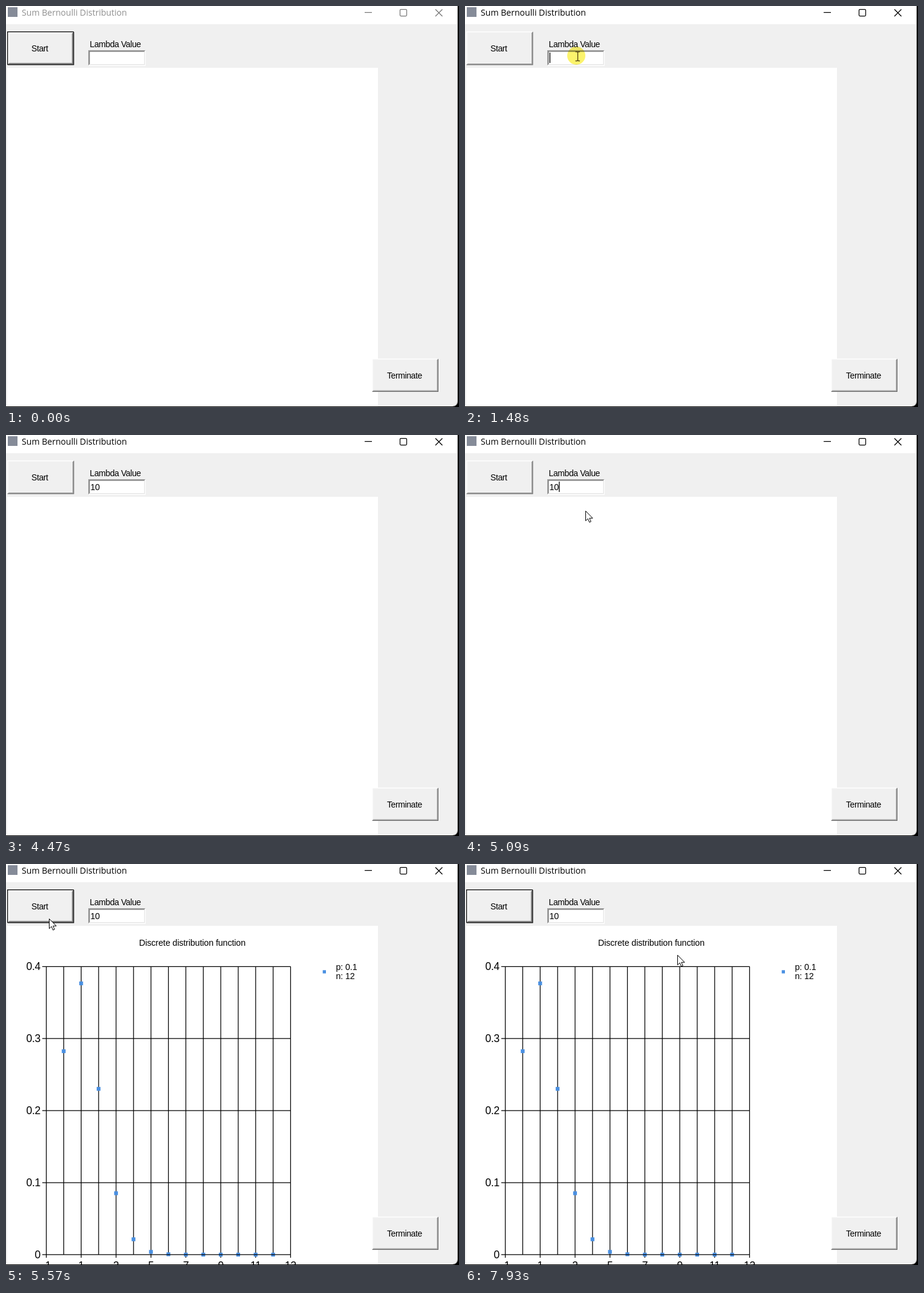
These frames come from a looping animation (749 px wide and 662 px high, 8 s). An HTML page:

```html
<!DOCTYPE html>
<html lang="en">
<head>
<meta charset="utf-8">
<title>Sum Bernoulli Distribution</title>
<style>
html, body { margin: 0; width: 100%; height: 100%; overflow: hidden; background: #f0f0f0; }
svg { display: block; font: 14px "Liberation Sans", Arial, sans-serif; letter-spacing: -.4px; }
.line { fill: none; stroke-width: 1.25; }
.caption { font: 14.1px "Open Sans", sans-serif; letter-spacing: 0; }
.axis { font-size: 17.5px; letter-spacing: -.3px; }
.chart-text { font-size: 14.3px; letter-spacing: -.12px; }
#halo { mix-blend-mode: multiply; }
</style>
</head>
<body>
<svg id="stage" width="749" height="662" viewBox="0 0 749 662"></svg>
<script>
const LOOP = 8000;

const rect = (x, y, w, h, fill) => `<rect x="${x}" y="${y}" width="${w}" height="${h}" fill="${fill}"/>`;
const line = (d, stroke) => `<path class="line" d="${d}" stroke="${stroke}"/>`;
const text = (x, y, s, cls = '', anchor = 'start') =>
  `<text x="${x}" y="${y}" class="${cls}" text-anchor="${anchor}">${s}</text>`;

// Thin frame, n line widths inside the box: top-left colour a, bottom-right colour b
function edge(x, y, w, h, n, a, b) {
  const inset = 1.25 * (n + .5), l = x + inset, t = y + inset, r = x + w - inset, d = y + h - inset;
  return line(`M${l} ${d}V${t}H${r}`, a) + line(`M${l} ${d}H${r}V${t}`, b);
}
const raised = (x, y, w, h, n = 0) =>
  edge(x, y, w, h, n + 1, '#f4f4f4', '#a0a0a0') + edge(x, y, w, h, n, '#fff', '#696969');

function chart() {
  const x0 = 66.6, dx = 28.85, y0 = 644.9, scale = 1189, right = x0 + 14 * dx;
  let grid = '', labels = '', points = '';
  for (let k = 0; k <= 14; k++) {
    const x = x0 + dx * k;
    grid += `M${x} ${y0 - .4 * scale}V${k % 2 ? y0 : 650}`;
    if (k % 2 === 0) labels += text(x, 669, k - 1, 'axis', 'middle');
  }
  for (let k = 0; k <= 4; k++) {
    const y = y0 - .1 * scale * k;
    if (k) grid += `M60 ${y}H${right}`;
    labels += text(57, y + 6, k ? '0.' + k : '0', 'axis', 'end');
  }
  // Binomial probabilities for n = 12, p = 0.1
  let p = .9 ** 12;
  for (let k = 0; k <= 12; k++) {
    points += rect(x0 + dx * (k + 1) - 3.2, y0 - p * scale - 3.2, 6.3, 6.3, '#4a90e2');
    p *= (12 - k) / (k + 1) / 9;
  }
  return line(grid, '#000') + points + line(`M60 ${y0}H${right}`, '#000')
    + labels + rect(523.7, 175.3, 5.3, 5.3, '#4a90e2')
    + text(220, 135, 'Discrete distribution function', 'chart-text')
    + text(545.5, 175, 'p: 0.1', 'chart-text') + text(545.5, 190, 'n: 12', 'chart-text');
}

stage.innerHTML = rect(0, 0, 749, 662, '#f0f0f0') + rect(0, 0, 749, 30, '#fff')
  + rect(3, 2, 16, 16, '#858b98')
  + `<g id="title">${text(26, 16, 'Sum Bernoulli Distribution', 'caption')}</g>`
  + `<g id="controls" class="line"><path d="M593 10.5H605M710 5.5L721.5 17M721.5 5.5L710 17"/>
     <rect x="651.5" y="5.5" width="11" height="11" rx="1.5"/></g>`
  + rect(2, 102, 613, 560, '#fff')
  + `<g id="plot">${chart()}</g>`
  + rect(605, 582, 110, 55, '#f0f0f0') + raised(605, 582, 110, 55) + text(630, 615, 'Terminate')
  + `<g id="normal">${raised(2, 42, 110.5, 55.5)}</g>`
  + `<g id="focused">${raised(2, 42, 110.5, 55.5, 1) + edge(2, 42, 110.5, 55.5, 0, '#000', '#000')}</g>`
  + `<g id="pressed">${edge(2, 42, 110.5, 55.5, 1, '#a0a0a0', '#a0a0a0') + edge(2, 42, 110.5, 55.5, 0, '#000', '#000')}</g>`
  + `<g id="startText">${text(42, 75, 'Start')}</g>`
  + text(138.5, 68, 'Lambda Value')
  + rect(136, 73, 95, 25.5, '#fff') + edge(136, 73, 95, 25.5, 0, '#a0a0a0', '#fff')
  + edge(136, 73, 95, 25.5, 1, '#696969', '#e3e3e3')
  + '<text id="entry" x="139.5" y="91" class="chart-text"></text>'
  + `<g id="caret">${rect(0, 77, 1.3, 17, '#000')}</g>`
  + line('M746.5 0V653a8 8 0 0 1-8 8', '#bbb')
  + '<path fill-rule="evenodd" d="M-20-20H749V662H-20ZM-30-30H747V653a8 8 0 0 1-8 8H-30Z"/>'
  + '<circle id="halo" r="15" fill="#fbf36c"/>'
  + '<path id="arrow" d="M0 0V16.2L3.7 12.7L6.2 18.6L8.8 17.5L6.3 11.8H11.6Z" fill="#fff" stroke="#000"/>'
  + `<g id="beam">${line('M-3.5-7.5H-.5L.5-6.5L1.5-7.5H4M-3.5 7.5H-.5L.5 6.5L1.5 7.5H4M.5-6.5V6.5', '#4a3a10')}</g>`;

// Pointer legs: start, step length, visible until, [step, x, y] stops
const legs = [
  [590, 68.2, 1890, [[0, 663, 164], [3, 400, 150], [6, 240, 130], [8, 185, 113], [9, 186, 92], [11, 186, 83]]],
  [4740, 69, 6630, [[0, 522, 213], [2, 430, 188], [5, 200, 126], [8, 80, 93], [9, 72, 91]]],
  [6630, 70, 7720, [[0, 84, 100], [2, 220, 200], [4, 430, 345], [6, 600, 463], [7, 630, 481],
    [8, 637, 492], [9, 644, 440], [10, 648, 389]]],
  [7720, 70, LOOP, [[0, 610, 358], [1, 500, 260], [2, 400, 185], [3, 352, 151]]]
];

function pointer(t) {
  const leg = legs.find(([from, , to]) => t >= from && t < to);
  if (!leg) return null;
  const [from, step, , stops] = leg;
  const s = Math.min(Math.floor((t - from) / step + .02), stops.at(-1)[0]);
  const i = Math.max(1, stops.findIndex(p => p[0] >= s));
  const a = stops[i - 1], b = stops[i], f = (s - a[0]) / (b[0] - a[0]);
  return [a[1] + (b[1] - a[1]) * f, a[2] + (b[2] - a[2]) * f];
}

const within = (t, ...spans) => spans.some(([a, b]) => t >= a && t < b);
const el = id => document.getElementById(id);
const show = (id, on) => el(id).setAttribute('visibility', on ? 'visible' : 'hidden');
const move = (id, x, y) => el(id).setAttribute('transform', `translate(${x} ${y})`);

function draw(t) {
  const active = t >= 1410, down = within(t, [5430, 5570]);
  el('title').setAttribute('fill', active ? '#000' : '#8f8f8f');
  el('controls').setAttribute('stroke', active ? '#000' : '#777');

  show('normal', within(t, [1410, 5430]));
  show('focused', !active || t >= 5570);
  show('pressed', down);
  move('startText', down ? 1 : 0, down ? 1 : 0);
  show('plot', t >= 5570);

  const typed = t < 3880 ? '' : t < 3940 ? '1' : '10';
  el('entry').textContent = typed;
  move('caret', 139.8 + 7.7 * typed.length, 0);
  show('caret', within(t, [1410, 2090], [2630, 3150], [3680, 4470], [5010, 5430]));

  const at = pointer(t);
  const overBox = at && at[0] > 136 && at[0] < 231 && at[1] > 73 && at[1] < 99;
  show('arrow', at && !overBox);
  show('beam', overBox);
  show('halo', down || within(t, [1410, 1620]));
  if (at) {
    move('arrow', at[0] - .5, at[1] - .5);
    move('beam', at[0], at[1]);
    move('halo', at[0] - (overBox ? 2 : 0), at[1] - (overBox ? 1 : 0));
  }
}

const begin = performance.now();
function tick() {
  draw((performance.now() - begin) % LOOP);
  requestAnimationFrame(tick);
}
tick();
</script>
</body>
</html>
```
